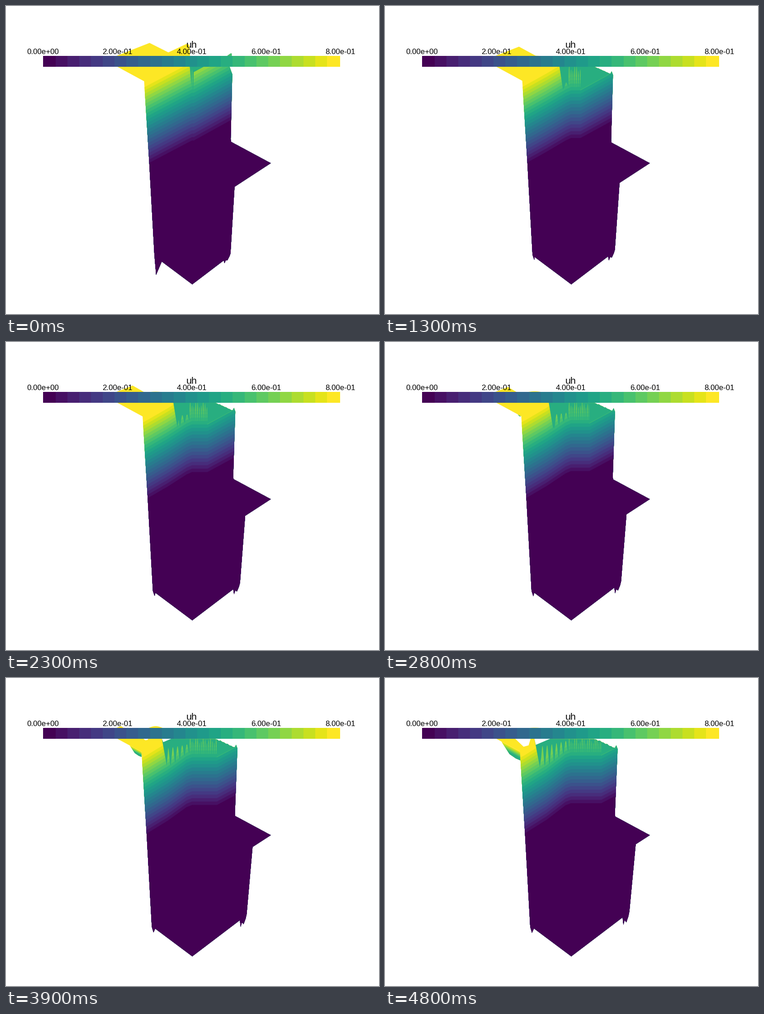
Animation of 825 by 679 pixels, one loop 4.9 s. Source, as a matplotlib script:

```python
import numpy as np
import matplotlib.pyplot as plt
from matplotlib.animation import FuncAnimation
from matplotlib.patches import Polygon, Rectangle

W, H, DPI = 825, 679, 100
FRAMES, STEP = 49, 100
BAND = 7.5          # height of one colour band on the wall
BAR_TOP, BAR_BOTTOM = 110, 134
COLORS = plt.get_cmap("viridis", 25)(np.arange(25))
YELLOW, POOL = COLORS[24], COLORS[15]
TEETH = np.random.default_rng(4).uniform(-1.5, 1.5, 12)

fig = plt.figure(figsize=(W / DPI, H / DPI), dpi=DPI, facecolor="white")
ax = fig.add_axes([0, 0, 1, 1])
ax.set_xlim(0.5, W + 0.5)
ax.set_ylim(H + 0.5, 0.5)
ax.axis("off")
parts = []


def mix(a, b, s):
    return a + (b - a) * s


def fill(points, color, clip=None):
    patch = Polygon(points, closed=True, facecolor=color, edgecolor="none", lw=0)
    ax.add_patch(patch)
    if clip is not None:
        patch.set_clip_path(clip)
    parts.append(patch)
    return patch


def rim(x):
    """Front edge of the yellow top, left of the wall."""
    return BAR_BOTTOM + 0.54 * (x - 246)


def scalar_bar():
    # each colour reaches to the right end, so no seams show
    for x, c in zip(np.r_[82, 110 + 26.13 * np.arange(24)], COLORS):
        ax.add_patch(Rectangle((x, BAR_TOP), 739.5 - x, 24.5,
                               facecolor=c, lw=0, zorder=5))
    style = dict(family="Liberation Sans", ha="center", va="baseline",
                 color="black", zorder=6)
    for n in range(5):
        ax.text(82.5 + 164.3 * n, 106, f"{0.2 * n:.2e}",
                size=16.7 * 72 / DPI, **style)
    ax.text(411.5, 92.5, "uh", size=21.5 * 72 / DPI, **style)


def right_shore(s, start):
    """Far edge of the pool, from the bar down to the right corner."""
    corner = mix(501, 515, s)
    x = np.linspace(463 + 37 * start, corner - 6, len(TEETH))
    y = BAR_BOTTOM + 0.45 * (x - 463) * (1 - start) + TEETH * s
    return [*zip(x, y), (corner - 3, mix(143, 149, s)),
            (corner, mix(151, 157, s))]


def right_foot(s):
    """Ragged lower right end, from the side down to the straight edge."""
    x0, y0 = mix(497, 541, s), mix(546, 515, s)
    x1 = mix(482, 526, s)
    y1 = 614 - 0.757 * (x1 - 412.5)
    a = np.array([0, 0.15, 0.45, 0.7, 0.88, 1])
    drop = np.array([0, 0.5, 1, 0.55, 1, 0]) * mix(8, 18, s)
    return list(zip(mix(x0, x1, a), mix(y0, y1, a) + drop))


def wall_outline(s, start):
    left, side, notch = mix(306, 299, s), mix(506, 555, s), mix(497.5, 509, s)
    inner = mix(332, 330, s) + 13 * start
    return [
        (246, BAR_BOTTOM),
        *right_shore(s, start),
        (notch, mix(294, 300, s)), (notch + 0.7, mix(300, 306, s)),
        (586, 347), (side, 399 - 0.655 * (side - 506)),
        *right_foot(s),
        (412.5, 614),
        (inner, 614 - 0.745 * (412.5 - inner)),
        (left + 26.5, mix(559, 562, s) + 34 * start),
        (left + 22.7, 549), (left + 11.3, 346), (left, rim(left)),
    ]


def zero_line(s, pool_right):
    """Height of the lowest colour boundary as a function of x."""
    xl, yl, mid = mix(318, 309, s), mix(346, 343.5, s), mix(297, 276.5, s)
    xs = [240, xl, 358, 400, 412, pool_right, mix(498, 511, s)]
    ys = [yl + 0.53 * (xl - 240), yl, mix(325, 313, s), mix(303, 281, s),
          mid, mid, mix(252, 260, s)]
    return lambda x: np.interp(x, xs, ys)


def pool_edge(s, zero, first, last):
    """Rippled lower edge of the green pool: wide waves, then fine spikes."""
    x = np.arange(first + 3, 407, 0.5)
    low = 15.6 + 0.06 * np.clip(365 - x, 0, None)
    high = mix(16.3, 18.9, s) + 0.07 * np.clip(400 - x, 0, None)
    wave = np.cos(np.pi * (x - mix(391, 390, s)) / 10.3) ** 2
    y = zero(x) - BAND * mix(low, high, wave)

    u = np.arange(max(407, first + 1), last, 0.25)
    n = np.round((u - 412) / 4.1)
    spike = np.cos(np.pi * (u - 412) / 4.1) ** 2
    base = zero(u) - BAND * 14.7 + 4 * np.sin(1.9 * n)
    v = mix(base, 137 + 7 * np.sin(1.7 * n + 0.5), spike)
    return [*zip(x, y), *zip(u, v)]


def draw_top(t, s, start):
    """Yellow sheet that shows above the scalar bar."""
    x = mix(318, 240, s)
    y = BAR_TOP - 0.39 * (x - 246)
    if y < BAR_TOP:
        fill([(246, 122), (246, BAR_TOP), (x, y),
              (x + (122 - y) / mix(0.5, 0.65, s), 122)], YELLOW)

    flap = 26 * (1 - start)
    fill([(350, 122), (357, 104 + flap), (400, 84 + flap),
          (406, 86 + flap), (408, 122)], YELLOW)
    tip = 105 + 15 * (1 - start)
    fill([(488, 122), (490, tip + 5), (497, tip), (500, tip), (500, 122)],
         COLORS[17])

    # a second swell rises and sinks again late in the loop
    swell = 12 * np.exp(-((t - 34.5) / 4) ** 2)
    u = np.linspace(0, 1, 20)
    fill([*zip(315 + 33 * u, BAR_TOP + 1 - (swell + 1) * np.sin(np.pi * u))],
         YELLOW)


def draw_facet(t):
    """Left side of the sinking yellow top."""
    q = (t - 26) / 22
    if q <= 0:
        return
    x0 = 298 - 40 * q
    x1, x2 = mix(x0, 300, 0.43), mix(x0, 300, 0.76)
    clip = fill([(x0, rim(x0)), (x1, rim(x1) + 18 * q),
                 (x2, rim(x2) + 20 * q), (300, 163 + 19 * q),
                 (300, rim(300))], YELLOW)
    for j in range(9):
        shift = 1.6 * q * (j + 0.5)
        fill([(240, rim(240) + shift), (302, rim(302) + shift),
              (302, 200), (240, 200)], COLORS[23 - j], clip)


def draw_wall(s, start):
    first, last = mix(413, 343, s) - 2 * start, mix(416, 479, s)
    top = mix(407, 331, s)
    zero = zero_line(s, last)
    wall = fill(wall_outline(s, start), YELLOW)

    x = np.arange(240, 600, 1.0)
    for k in range(23, -1, -1):
        fill([*zip(x, zero(x) - BAND * k), (600, 640), (240, 640)],
             COLORS[k], wall)

    # crests behind the pool edge never get brighter than this level
    cap = round(19 + 5 * start)
    u = np.arange(first, 530, 1.0)
    fill([(top, 130), *zip(u, zero(u) - BAND * (cap - 1)), (530, 130)],
         COLORS[cap], wall)

    rest = 14.1 + 6 * start
    line = [(v, zero(v) - BAND * rest) for v in (last, 500)]
    line.append((516, line[-1][1] - 7))
    fill([(top, 130), (top, BAR_BOTTOM), (first, mix(180, 197, s)),
          *pool_edge(s, zero, first, last), *line, (530, 120)], POOL, wall)
    if start < 0.1:
        glint, = ax.plot(*zip(*line), color=COLORS[16], lw=1.1)
        glint.set_clip_path(wall)
        parts.append(glint)

    # gap between the yellow top and the far edge of the pool
    if top < 367:
        fill([(top, 130), (top, BAR_BOTTOM),
              (top + 3, BAR_BOTTOM + 0.42 * (364 - top)),
              (367, BAR_BOTTOM), (367, 130)], "white")


def draw_dent(t):
    """Hollow that opens in the yellow top."""
    g = (t - 36) / 12
    if g > 0:
        fill([(308 - 21 * g, 133), (309 - 2 * g, 133 + 19 * g),
              (312 + 6 * g, 133 + 16 * g), (314 + 9 * g, 133)], "white")


def draw(t):
    for p in parts:
        p.remove()
    parts.clear()
    s = t / (FRAMES - 1)
    start = np.exp(-t / 2)      # quick first settling
    draw_top(t, s, start)
    draw_facet(t)
    draw_wall(s, start)
    draw_dent(t)
    return parts


scalar_bar()
anim = FuncAnimation(fig, draw, frames=FRAMES, interval=STEP,
                     repeat=True, repeat_delay=0, blit=False)
plt.show()
```
